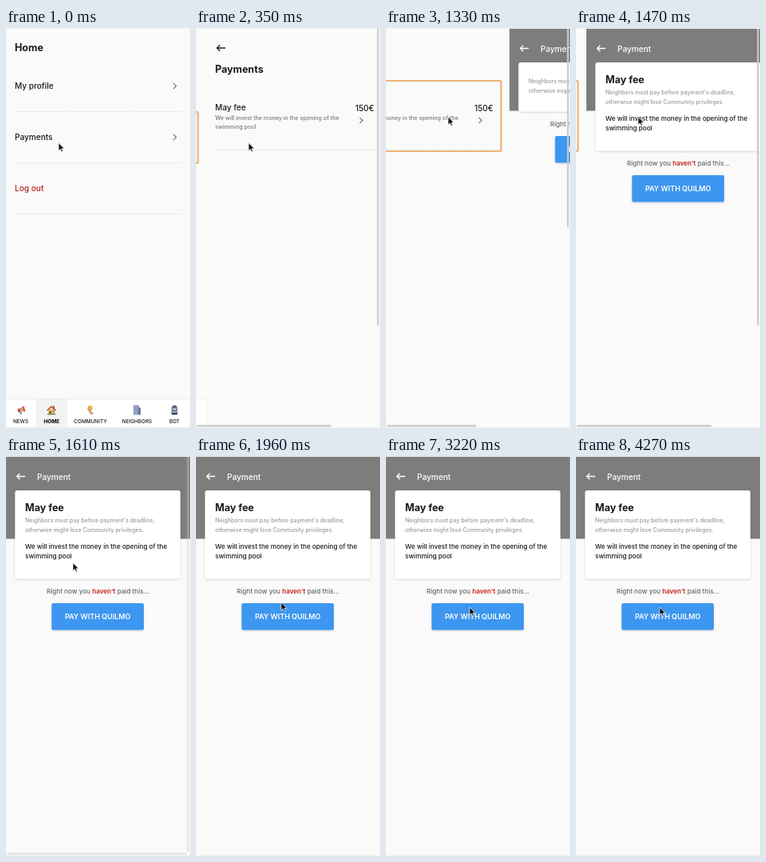
Write an HTML page that moves like this. It is 231 px wide and 500 px high and loops after 4620 ms.

```html
<!DOCTYPE html>
<html lang="en">
<head>
<meta charset="utf-8">
<title>Payments flow</title>
<style>
  html, body { margin: 0; width: 100%; height: 100%; overflow: hidden; background: #fafafa; }
  svg { display: block; width: 231px; height: 500px; }
  text { font-family: Inter, Lato, sans-serif; fill: #1a1a1a; }
  .title { font-size: 12.5px; font-weight: 700; }
  .row { font-size: 10.1px; font-weight: 550; }
  .note { font-size: 7.1px; font-weight: 500; fill: #777; }
  .hint { fill: #999; }
  .body { font-size: 8.15px; font-weight: 500; }
  .tab { font-size: 6.4px; font-weight: 500; text-anchor: middle; }
  .line { stroke: #dedede; stroke-width: .8; stroke-dasharray: 1 .6; }
  .focus { fill: none; stroke: #eab676; stroke-width: 2.2; }
</style>
</head>
<body>
<svg viewBox="0 0 231 500">
  <defs>
    <filter id="shadow" x="-10%" y="-10%" width="120%" height="130%">
      <feDropShadow dx="0" dy="1" stdDeviation="1.2" flood-opacity=".18"/>
    </filter>
    <path id="chevron" d="M0-3.6 3.7 0 0 3.6" fill="none" stroke="#777" stroke-width="1.2"/>
    <path id="back" d="M11.3 0H.8M4.6-3.7.8 0 4.6 3.7" fill="none" stroke-width="1.4"/>
  </defs>
  <rect width="231" height="500" fill="#fafafa"/>

  <g id="home">
    <text class="title" x="11" y="28.5">Home</text>
    <text class="row" x="11" y="76">My profile</text>
    <text class="row" x="11" y="140">Payments</text>
    <text class="row" x="11" y="204" style="fill:#b3261e">Log out</text>
    <use href="#chevron" x="210" y="72.5"/>
    <use href="#chevron" x="210" y="136.5"/>
    <path class="line" d="M11 104.5H220M11 168.5H220M11 232.5H220"/>
    <rect class="focus" x="10" y="105" width="210.5" height="64" rx="1.5"/>
    <rect y="463" width="231" height="1" fill="#ececec"/>
    <rect y="464" width="231" height="36" fill="#fff"/>
    <rect x="38" y="464" width="39" height="36" fill="#f2f2f2"/>
    <g transform="translate(19 477.5) scale(.9)">
      <path d="M-5-1 3-5 5 2-4 3z" fill="#d9a08b"/>
      <path d="M2-5.5 4-5 6 2 4 2.5z" fill="#c94b3f"/>
      <path d="M-5-1-2-2-1 2.5-4 3z" fill="#b84a3d"/>
      <path d="M-2 3 0 2.5 1 5.5-1 6z" fill="#69728c"/>
    </g>
    <g transform="translate(57 477.5)">
      <path d="M-4-1H4.5V5.5H-4z" fill="#e8b765"/>
      <path d="M2-5H4V-1H2z" fill="#9c5545"/>
      <path d="M-6 0 0-5.5 6 0 5 1 0-3-5 1z" fill="#c75338"/>
      <path d="M-2.5 1.5H0V5.5H-2.5z" fill="#87513b"/>
      <path d="M1.5 1H3.5V3H1.5z" fill="#72a6cd"/>
      <path d="M-5 4.5H5V6H-5z" fill="#75964c"/>
    </g>
    <g transform="translate(105.5 477.5) scale(.9)">
      <ellipse cx="0" cy="-2.5" rx="3.4" ry="3.8" fill="#edb151"/>
      <path d="M-4-2-2-3 2 1 1 5-1 4z" fill="#e0a06a"/>
      <path d="M0 3 4 2.5 4.5 6H0z" fill="#d4a398"/>
    </g>
    <g transform="translate(164 477.5)">
      <path d="M-4-6H3V6H-4z" fill="#8796b3"/>
      <path d="M2-3H5V6H2z" fill="#687a9e"/>
      <path d="M-2.5-5V5M0-5V5" stroke="#b9c5d9" stroke-dasharray="1.2 1"/>
    </g>
    <g transform="translate(211.5 477.5)">
      <path d="M-3.6-1Q-3.6-6 0-6T3.6-1V2H-3.6z" fill="#58657d"/>
      <path d="M-2.5-2H2.5V0H-2.5z" fill="#c5d2e4"/>
      <path d="M-4.5 3H4.5L3 6H-3z" fill="#3c465c"/>
    </g>
    <text class="tab" x="18.5" y="494">NEWS</text>
    <text class="tab" x="57.4" y="494" style="font-weight:800">HOME</text>
    <text class="tab" x="106" y="494">COMMUNITY</text>
    <text class="tab" x="164.5" y="494">NEIGHBORS</text>
    <text class="tab" x="211.5" y="494">BOT</text>
  </g>

  <g id="list">
    <use href="#back" x="12.5" y="25" stroke="#222"/>
    <text class="title" x="11" y="55.5">Payments</text>
    <text class="row" x="11" y="103">May fee</text>
    <text class="note" x="11" y="115">We will invest the money in the opening of the</text>
    <text class="note" x="11" y="126">swimming pool</text>
    <text class="row" x="187" y="104">150€</text>
    <use href="#chevron" x="192.5" y="115.5"/>
    <path class="line" d="M11 152.5H220"/>
    <rect class="focus" x="10" y="66" width="210.5" height="88" rx="1.5"/>
  </g>

  <g id="detail">
    <rect width="231" height="500" fill="#fafafa"/>
    <rect width="231" height="103.5" fill="#7d7d7d"/>
    <use href="#back" x="12.8" y="25.5" stroke="#fff"/>
    <text class="row" x="39" y="29.8" style="fill:#fff">Payment</text>
    <rect id="card" x="11.3" y="43" width="207.7" rx="3" fill="#fff" filter="url(#shadow)"/>
    <g id="hint">
      <text class="note hint" x="24" y="83">Neighbors must pay before payment's deadline,</text>
      <text class="note hint" x="24" y="94.5">otherwise might lose Community privileges.</text>
    </g>
    <g id="fee">
      <text class="title" x="24" y="68.5">May fee</text>
      <text class="body" x="24" y="115.8">We will invest the money in the opening of the</text>
      <text class="body" x="24" y="128.3">swimming pool</text>
    </g>
    <g id="action">
      <text class="body" x="115.5" y="171.5" text-anchor="middle" style="fill:#666">Right now you <tspan fill="#c4211c" font-weight="600">haven't</tspan> paid this...</text>
      <rect x="57.3" y="184" width="115.7" height="33.5" rx="2" fill="#3c96ef" filter="url(#shadow)"/>
      <text x="115.2" y="204" text-anchor="middle" font-size="9" font-weight="600" style="fill:#fff">PAY WITH QUILMO</text>
    </g>
  </g>

  <g id="bars" fill="#c9c9c9">
    <rect id="barX" x="1" y="496.3" height="2.2" rx="1.1"/>
    <rect id="barY" x="227.3" width="2.2" rx="1.1"/>
  </g>
  <path d="M0 .5H231M0 499.5H231" stroke="#f0f0f0"/>
  <path id="cursor" d="M0 0V10L2.3 7.9 3.8 11.3 5.5 10.6 4 7.3H7.2z" fill="#111" stroke="#fff" stroke-width=".7"/>
</svg>
<script>
const LOOP = 4620, STEP = 70, WIDTH = 231, HEIGHT = 500;
const $ = id => document.getElementById(id);
const pages = ['home', 'list', 'detail'].map($);
const starts = [70, 1190];
const feeLoaded = 1400;
// Left edge of the incoming page, one entry per step of a slide.
const slide = [WIDTH, WIDTH, 155, 79, 13, 2, 0, 0];
// time, x, y
const cursorPath = [
  [0, 66, 143.5], [350, 66, 143.5], [490, 69, 136], [560, 72, 128], [700, 78, 111],
  [1470, 78, 111], [1540, 79, 116], [1680, 89, 151], [1820, 101, 175],
  [1960, 107, 183], [2240, 107, 186], [2450, 105, 189], [LOOP, 105, 189]
];

function cursorAt(t) {
  const i = cursorPath.findIndex(p => p[0] > t);
  const [t0, x0, y0] = cursorPath[i - 1], [t1, x1, y1] = cursorPath[i];
  const k = (t - t0) / (t1 - t0);
  return [x0 + (x1 - x0) * k, y0 + (y1 - y0) * k];
}

const show = (node, visible) => { node.style.display = visible ? '' : 'none'; };
const move = (node, x, y) => node.setAttribute('transform', `translate(${x} ${y})`);

// The card grows and pushes the rest down once the fee arrives.
function layoutCard(loaded) {
  show($('fee'), loaded);
  $('card').setAttribute('height', loaded ? 110.5 : 61.5);
  move($('hint'), 0, loaded ? 0 : -14);
  move($('action'), 0, loaded ? 0 : -49);
}

function drawBars(k) {
  const visible = k >= 2 && k <= 6;
  show($('bars'), visible);
  if (!visible) return;
  // Scrollbars trail the slide by one step.
  const part = WIDTH / (WIDTH + slide[k - 1]);
  $('barX').setAttribute('width', part * WIDTH - 3);
  $('barY').setAttribute('height', part * HEIGHT - 1);
  $('bars').setAttribute('opacity', k === 6 ? .5 : 1);
}

function render(time) {
  const t = Math.floor((time % LOOP) / STEP) * STEP;
  const current = t >= starts[1] ? 1 : 0;
  const k = Math.floor((t - starts[current]) / STEP);
  const x = k < 0 ? WIDTH : slide[Math.min(k, slide.length - 1)];

  pages.forEach((page, i) => {
    const left = i === current ? x - WIDTH : i === current + 1 ? x : WIDTH;
    show(page, Math.abs(left) < WIDTH);
    move(page, left, 0);
    const focus = page.querySelector('.focus');
    if (focus) show(focus, i === current && k >= 0);
  });
  layoutCard(t >= feeLoaded);
  drawBars(k);
  move($('cursor'), ...cursorAt(t));
}

const begin = performance.now();
function tick() {
  render(performance.now() - begin);
  requestAnimationFrame(tick);
}
tick();
</script>
</body>
</html>
```
